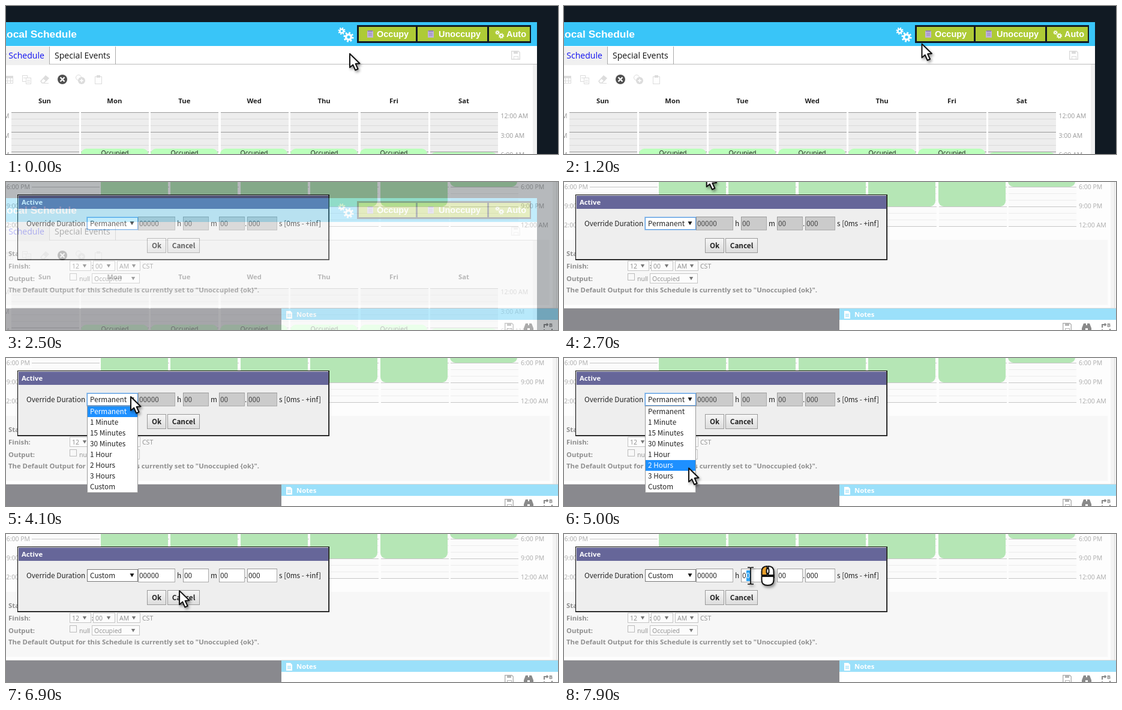
An HTML page that plays this animation: 920x248 px, repeating every 8 s.

```html
<!DOCTYPE html>
<html lang="en">
<head>
<meta charset="utf-8">
<title>Schedule override</title>
<style>
  html, body { margin: 0; width: 100%; height: 100%; overflow: hidden; background: #111a23; }
  svg { display: block; width: 920px; height: 248px; }
  text { font-family: "Open Sans", "Noto Sans", sans-serif; font-size: 10.5px; white-space: pre; }
  rect { shape-rendering: crispEdges; }
  .soft { shape-rendering: auto; }
  .head { font: bold 17.4px "Liberation Sans", Arial, sans-serif; fill: #fff; }
  .btn { font: bold 14.5px "Liberation Sans", Arial, sans-serif; fill: #fff; }
  .tab { font-size: 14.1px; }
  .bold { font-weight: bold; font-size: 11.3px; }
  .tiny { font-weight: bold; font-size: 9px; }
  .form { font-family: "Noto Sans CJK JP", "Noto Sans CJK SC", "Noto Sans", sans-serif; font-size: 11.8px; fill: #222; }
  .strong { font-weight: bold; }
  .end { text-anchor: end; }
  .mid { text-anchor: middle; }
  .cursor { filter: drop-shadow(2px 3px 2px rgba(0, 0, 0, .4)); }
</style>
</head>
<body>
<svg id="stage" viewBox="0 0 920 248" xmlns="http://www.w3.org/2000/svg">
  <defs>
    <linearGradient id="face" x2="0" y2="1">
      <stop stop-color="#f6f6f6"/><stop offset="1" stop-color="#dcdcdc"/>
    </linearGradient>
  </defs>
  <g id="page"></g>
  <g id="modal"></g>
  <g id="arrow" class="cursor">
    <path d="M1 1V24L6.2 19.5L10.2 28.5L14.6 26.5L10.6 17.8L17.5 17.2Z" fill="#fff" stroke="#111" stroke-width="2" stroke-linejoin="round"/>
  </g>
  <g id="hand" class="cursor">
    <path d="M-2 3Q-2 1 0 1T2 3V11Q5 9 6.5 11.5Q9.5 10.5 10.5 13Q14 12 14 16V21Q14 24 12 27V30H1V27L-6 18Q-7.5 14.5 -4.5 14.5L-2 17Z" fill="#fff" stroke="#111" stroke-width="1.8" stroke-linejoin="round"/>
    <path d="M2 11V16M6.5 12V17M10.5 13V18" stroke="#111" stroke-width="1.3"/>
  </g>
  <g id="beam" class="cursor">
    <path d="M-5 -14H-2Q0 -14 0 -12Q0 -14 2 -14H5M0 -12V12M-5 14H-2Q0 14 0 12Q0 14 2 14H5" fill="none" stroke="#111" stroke-width="1.7"/>
  </g>
  <g id="mouse" class="cursor">
    <g transform="translate(2 1)" stroke="#111" stroke-width="2" stroke-linejoin="round">
      <path d="M10 1C3 1 1 5 1 10V16H10Z" fill="#e9a02c"/>
      <path d="M12 1C19 1 21 5 21 10V16H12Z" fill="#fff"/>
      <path d="M1 18H21V24C21 30 17 33 11 33S1 30 1 24Z" fill="#fff"/>
      <rect class="soft" x="9" y="5" width="4" height="8" rx="2" fill="#fff"/>
    </g>
  </g>
</svg>
<script>
const $ = id => document.getElementById(id);
const R = (x, y, w, h, fill, more = '') => `<rect x="${x}" y="${y}" width="${w}" height="${h}" fill="${fill}" ${more}/>`;
const box = (x, y, w, h, fill, line) => R(x + .5, y + .5, w - 1, h - 1, fill, `stroke="${line}"`);
const T = (x, y, s, cls = '', fill = '') =>
  `<text x="${x}" y="${y}" class="${cls}" ${fill && `style="fill:${fill}"`}>${s}</text>`;
const P = (d, fill, line = 'none', w = 1.5) => `<path d="${d}" fill="${fill}" stroke="${line}" stroke-width="${w}"/>`;
const at = (x, y, s) => `<g transform="translate(${x} ${y})">${s}</g>`;
const range = n => [...Array(n).keys()];

function gear(x, y, r, fill) {
  const tooth = Math.PI * r / 8;
  return at(x, y, `<g fill="none" stroke="${fill}">
    <circle r="${r * .62}" stroke-width="${r * .5}"/>
    <circle r="${r}" stroke-width="${r * .45}" stroke-dasharray="${tooth}"/></g>`);
}

const floppy = (x, y, c) => at(x, y,
  P('M.7 .7H12L14.3 3V14.3H.7Z', 'none', c) + R(4, 1, 7, 4, c) + R(4, 9, 7, 5, 'none', `stroke="${c}"`));

const notepad = (x, y) => at(x, y,
  R(0, 1, 10, 11, '#c0b2dc') + R(1, 0, 8, 2, '#8f7fb5') + [4, 6, 8].map(r => R(2, r, 6, 1, '#9a8cc0')).join(''));

// Seven day columns with hour lines; every third line is darker.
function columns(x0, y0, hours, c) {
  return range(7).map(i => {
    const x = Math.round(x0 + i * 116.4);
    return R(x, y0, 113, hours * 11, c.fill) +
      range(hours + 1).map(h => R(x, y0 + h * 11, 113, 1, h % 3 ? c.thin : c.thick)).join('');
  }).join('');
}

function drawPage() {
  const icon = '#dcdcdc';
  let s = R(0, 0, 920, 248, '#111a23') + R(0, 27, 885, 40, '#39c5f8') + R(0, 67, 885, 181, '#fff');
  s += T(118, 53, 'Local Schedule', 'head end');
  s += gear(559.5, 42, 5, '#fff') + gear(571, 52, 7, '#fff');

  s += R(585, 32, 290, 30, '#111a23');
  for (const [x, w] of [[588, 95], [686, 116], [805, 68]]) s += R(x, 35, w, 24, '#aecb36');
  s += notepad(602, 41) + notepad(703, 41) + gear(819, 44.5, 3, '#fff') + gear(825.5, 50, 3.8, '#fff');
  s += T(618, 52, 'Occupy', 'btn') + T(721, 52, 'Unoccupy', 'btn') + T(834, 52, 'Auto', 'btn');

  s += R(0, 68, 72, 31, '#f0f0f0') + R(72, 97, 813, 1, '#bbb') + R(72, 68, 1, 30, '#aaa') + R(182, 68, 1, 30, '#aaa');
  s += R(878, 98, 7, 150, '#f0f0f0');
  s += T(64, 88, 'Weekly Schedule', 'tab end', '#1010f0') + T(81, 88, 'Special Events', 'tab', '#111');
  s += floppy(842, 75, icon);

  s += at(-2, 116, box(0, 1, 14, 13, 'none', icon) + R(0, 1, 14, 4, icon) + R(4, 5, 1, 9, icon) + R(9, 5, 1, 9, icon) + R(0, 9, 14, 1, icon));
  s += at(27, 116, box(0, 0, 9, 11, '#fff', icon) + box(6, 4, 9, 11, '#fff', icon) + R(2, 4, 4, 1, icon) + R(8, 8, 5, 1, icon) + R(8, 11, 5, 1, icon));
  s += at(57, 116, P('M1 10L9 1L14 5L6 13H3Z', 'none', icon) + P('M5 6L10 10L14 5L9 1Z', icon) + R(6, 13, 8, 1, icon));
  s += at(94, 123, '<circle r="8" fill="#505050"/>' + P('M-3.5 -3.5L3.5 3.5M3.5 -3.5L-3.5 3.5', 'none', '#fff', 2.4));
  s += `<circle cx="121" cy="120" r="4.5" fill="none" stroke="${icon}"/><circle cx="126" cy="125" r="6" fill="${icon}"/>` + P('M123 125H129M126 122V128', 'none', '#fff');
  s += at(148, 116, box(0, 2, 12, 13, 'none', icon) + R(3, 0, 6, 4, icon));

  'Sun Mon Tue Wed Thu Fri Sat'.split(' ').forEach((d, i) => s += T(64.5 + i * 116.4, 163, d, 'bold mid', '#222'));
  s += columns(8.6, 178, 9, { fill: '#ededed', thin: '#dadada', thick: '#999' });
  range(6).forEach(i => {
    const x = Math.round(124.5 + i * 116.4), y = i < 5 ? 239 : 245;
    s += R(x, y, 112, 40, '#bbffbb', 'rx="9" class="soft"');
    if (i < 5) s += T(x + 56.5, 250, 'Occupied', 'mid', '#111');
  });
  ['12:00 AM', '3:00 AM', '6:00 AM'].forEach((h, i) => {
    s += T(824.5, 188 + i * 32.5, h, '', '#999') + T(5.5, 188 + i * 32.5, h, 'end', '#999');
  });
  return s;
}

const caret = (x, y, c, k = 1) => P(`M${x - 3.2 * k} ${y - 2.6 * k}H${x + 3.2 * k}L${x} ${y + 3 * k}Z`, c);
const pale = (x, y, w, s) => box(x, y, w, 17, '#fcfcfc', '#c4c4c4') + T(x + 4, y + 12.5, s, '', '#8c8c8c') + caret(x + w - 11, y + 8.5, '#777');

function drawBackdrop() {
  const ink = '#8f8f8f', icon = '#b4b4b4';
  let s = R(0, 0, 920, 248, '#fdfdfd') + R(911, 0, 9, 211, '#f4f4f4') + R(917, 0, 1, 211, '#ddd');
  s += columns(42.6, -25, 9, { fill: '#fbfbfb', thin: '#ececec', thick: '#c6c6c6' });
  range(6).forEach(i => s += R(Math.round(158 + i * 116.4), -30, 112, i < 5 ? 71 : 38, '#b5e6b5', 'rx="9" class="soft"'));
  ['6:00 PM', '9:00 PM', '12:00 AM'].forEach((h, i) => {
    s += T(40, 12 + i * 32.2, h, 'end', '#aaa') + T(858, 12 + i * 32.2, h, '', '#aaa');
  });

  s += R(0, 97, 906, 109, '#f7f7f7');
  s += T(4, 124, 'Start:', 'bold', ink) + T(4, 145, 'Finish:', 'bold', ink) + T(4, 166, 'Output:', 'bold', ink);
  s += pale(106, 132, 36, '12') + T(142.5, 145, ':', 'bold', ink) + pale(145, 132, 37, '00') + pale(185, 132, 39, 'AM');
  s += T(227, 145, 'CST', '', ink) + box(106, 153, 12, 12, '#f8f8f8', '#bbb') + T(122, 166, 'null', '', ink) + pale(143, 153, 80, 'Occupied');
  s += T(4, 185, 'The Default Output for this Schedule is currently set to "Unoccupied {ok}".', 'bold', ink);

  s += R(0, 211, 920, 1, '#d8d8d8') + R(0, 212, 459, 36, '#89898e') + R(459, 212, 461, 19, '#9be0fa') + R(459, 231, 461, 17, '#fff');
  s += P('M467 216H474L477 219V229H467Z', '#fff') + [221, 223, 225].map(y => R(469, y, 6, 1, '#9be0fa')).join('');
  s += T(484, 226, 'Notes', 'bold', '#fff');
  s += floppy(831, 236, icon);
  s += at(863, 236, P('M3 1H7V4H9V1H13L16 9V13H10V9H6V13H0V9Z', '#8a8a8a'));
  s += at(896, 237, P('M1 7V2H7M5 0L7 2L5 4M14 9V13H8M1 10V13H5', 'none', '#8a8a8a', 2)) + T(905, 243, 'B', 'tiny', '#8a8a8a');
  return s;
}

const options = ['Permanent', '1 Minute', '15 Minutes', '30 Minutes', '1 Hour', '2 Hours', '3 Hours', 'Custom'];

function field(x, w, s, on) {
  return R(x, 58, w, 23, '#999') + R(x + 1, 59, w - 1, 22, '#aaa') +
    R(x + 1, 59, w - 2, 21, on ? '#fff' : '#cbcbcb') + T(x + 2, 74, s, 'form', on ? '#222' : '#444');
}

const button = (x, w, s) => R(x + .5, 94.5, w - 1, 24, 'url(#face)', 'stroke="#999"') +
  T(x + w / 2, 111, s, 'form mid strong');

function drawDialog(custom) {
  let s = R(19, 21, 520, 110, '#000') + R(20, 22, 518, 108, '#eee') + R(537, 22, 1, 108, '#555') + R(20, 129, 518, 1, '#555');
  s += R(21, 23, 516, 22, '#666699') + T(26, 38, 'Active', 'bold', '#fff');
  s += T(34, 74, 'Override Duration', 'form');
  s += custom ? box(135, 59, 85, 21, '#fff', '#777') : box(134, 58, 87, 23, '#fff', '#a9cdf0') + box(135, 59, 85, 21, '#fff', '#5a9be0');
  s += T(140, 74, custom ? 'Custom' : 'Permanent', 'form') + caret(210, 69, '#111', 1.1);
  s += field(220, 62, '00000', custom) + T(285, 74, 'h', 'form') + field(295, 43, '00', custom) + T(341, 74, 'm', 'form');
  s += field(355, 43, '00', custom) + T(398, 74, '.', 'form') + field(402, 50, '000', custom) + T(455, 74, 's [0ms - +inf]', 'form');
  return s + button(235, 32, 'Ok') + button(269, 54, 'Cancel');
}

function drawList() {
  return box(135, 80, 85, 146, '#fff', '#999') + `<rect id="hover" x="136" width="83" height="18" fill="#1e90ff"/>` +
    options.map((o, i) => T(140, 94 + i * 18, o, 'form option')).join('');
}

const selection = R(303.6, 61, 7, 18, '#2ea3f2') + T(303.6, 74, '0', 'form', '#fff');
const group = (id, s) => `<g id="${id}">${s}</g>`;

$('page').innerHTML = drawPage();
$('modal').innerHTML = drawBackdrop() + group('preset', drawDialog(false)) + group('custom', drawDialog(true)) +
  group('list', drawList()) + group('picked', selection);
const optionTexts = document.querySelectorAll('.option');

// start, end, from x, y, to x, y
const moves = [
  [900, 1500, 572, 79, 619, 46],
  [2300, 3400, 249, -49, 207, 64],
  [4100, 5350, 207, 64, 207, 210],
  [6100, 7200, 207, 210, 305, 70],
  [7800, 7900, 305, 70, 311, 70]
];
const clicks = [[1600, 2100], [3500, 4000], [5500, 6000], [7400, 8000]];
const mouseOffset = { arrow: [27, 0], hand: [22, -2], beam: [15.5, -18] };

const clamp = v => Math.min(1, Math.max(0, v));
const ease = p => (1 - Math.cos(Math.PI * p)) / 2;
const show = (id, on) => $(id).style.display = on ? '' : 'none';
const place = (id, x, y) => $(id).setAttribute('transform', `translate(${x} ${y})`);

function pointer(t) {
  const [a, b, x0, y0, x1, y1] = moves.filter(m => t >= m[0]).pop() || moves[0];
  const p = ease(clamp((t - a) / (b - a)));
  return [x0 + (x1 - x0) * p, y0 + (y1 - y0) * p];
}

function render(t) {
  const [x, y] = pointer(t);
  const fade = clamp((t - 2150) / 500);
  $('modal').style.opacity = fade;
  show('modal', fade > 0);

  const custom = t >= 6000, open = t >= 4000 && !custom;
  show('preset', !custom);
  show('custom', custom);
  show('list', open);
  show('picked', t >= 7900);
  const row = Math.min(7, Math.max(0, Math.floor((y - 81) / 18)));
  $('hover').setAttribute('y', 81 + row * 18);
  optionTexts.forEach((o, i) => o.style.fill = i === row ? '#fff' : '#222');

  const kind = t < 2300 && x > 587 && y < 61 ? 'hand' : custom && x > 294 && y < 80 ? 'beam' : 'arrow';
  const visible = t < 2200 || t >= 2600;
  for (const id in mouseOffset) show(id, visible && id === kind);
  place(kind, x, y);
  const [dx, dy] = mouseOffset[kind];
  place('mouse', x + dx, y + dy);
  show('mouse', clicks.some(([a, b]) => t >= a && t < b));
}

const begin = performance.now();
function tick() {
  const t = (performance.now() - begin) % 8000;
  render(Math.floor(t / 100) * 100);
  requestAnimationFrame(tick);
}
tick();
</script>
</body>
</html>
```
